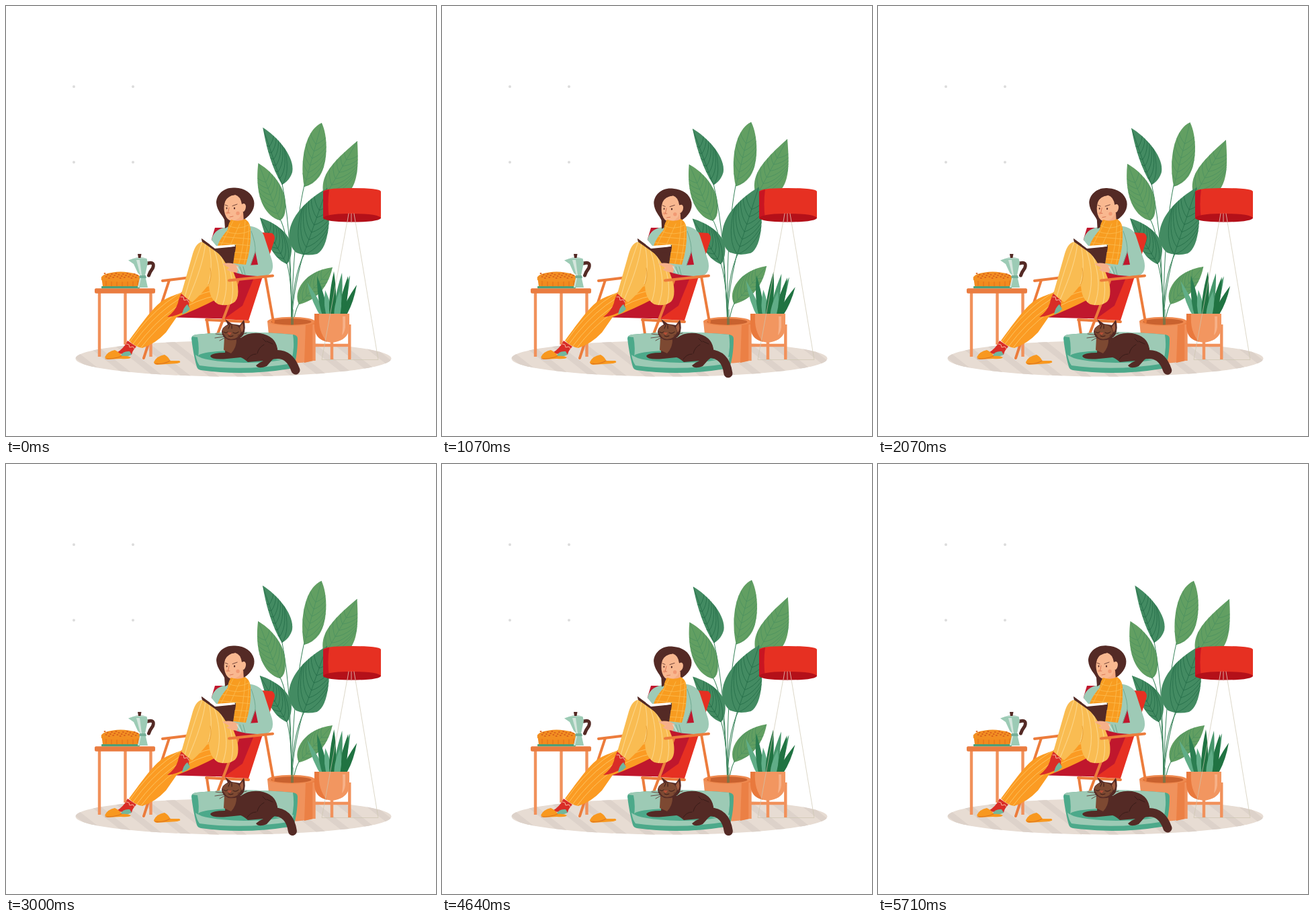
An HTML page for the animation above (5780 ms loop, 640 by 640 pixels).

```html
<!DOCTYPE html>
<html lang="en">
<head>
<meta charset="utf-8">
<title>Reading at home</title>
<style>
  html, body { margin: 0; width: 100%; height: 100%; overflow: hidden; background: #fff; }
  svg { display: block; width: 100vw; height: 100vh; }
  .line { fill: none; stroke-linecap: round; stroke-linejoin: round; }
  .wood { stroke: #ec7c3c; stroke-width: 4; }
  .pale { stroke: #f1915b; stroke-width: 4.4; stroke-linecap: butt; }
  .stem { stroke: #38835a; stroke-width: 1; }
  .dark { fill: #542a25; }
</style>
</head>
<body>
<svg viewBox="0 0 640 640">
  <defs>
    <clipPath id="rugClip"><ellipse cx="338.5" cy="524.8" rx="235" ry="26.6"/></clipPath>
    <clipPath id="farLegClip"><path id="farLeg" d="M306 409C280 421 246 430 231 440C216 452 198 478 183 498Q191 507 203 509Q222 503 238 486L254 463Q284 452 318 434Z"/></clipPath>
    <clipPath id="nearLegClip"><path id="nearLeg" d="M292 351C284 352 280 361 277 372L261 428Q269 436 277 441Q291 429 302 414Q302 436 316 444Q331 448 341 440Q347 434 345 417Q340 391 323 371Q307 353 292 351Z"/></clipPath>
    <clipPath id="scarfClip"><path id="scarf" d="M335 318Q346 322 356 317Q365 323 364 337Q365 360 357 385L338 383Q340 367 342 355L314 362Q315 350 330 333Q331 323 335 318Z"/></clipPath>
  </defs>

  <g fill="#dcdcdc">
    <circle cx="101" cy="120" r="2"/><circle cx="189" cy="120" r="2"/>
    <circle cx="101" cy="232.500" r="2"/><circle cx="189" cy="232.500" r="2"/>
  </g>

  <g clip-path="url(#rugClip)">
    <path fill="#e7dcd3" d="M100 495H580V555H100Z"/>
    <g id="rugStripes" stroke="#ddd2ca" stroke-width="9"></g>
  </g>

  <!-- tall plant -->
  <g id="plant">
    <g class="line stem">
      <path d="M425 477C424 400 424 330 411 264"/>
      <path d="M425 477C426 400 432 320 444 267"/>
      <path d="M425 477C426 410 452 330 474 283"/>
      <path d="M426 477C424 400 422 345 408 317"/>
      <path d="M425 477C425 430 431 393 445 367"/>
      <path d="M425 477C426 440 424 405 418 382"/>
      <path d="M427 477Q429 456 436 443"/>
    </g>
  </g>
  <path fill="#f0925c" d="M389 469H460L457 528Q425 535 395 528Z"/>
  <path fill="#eb8045" d="M446 473L460 470L457 528L444 531Z"/>
  <ellipse cx="424.500" cy="469.500" rx="35.500" ry="6.800" fill="#ef8a50"/>
  <ellipse cx="424.500" cy="470" rx="30" ry="4.700" fill="#c9622f"/>
  <path class="line stem" d="M425 474V450M427 474V452"/>

  <!-- small plant -->
  <g id="blades"></g>
  <path class="line pale" d="M458.500 474V528M511.300 474V526M485 498V526M458 505H513"/>
  <path fill="#f29660" d="M459 458H511V478Q510 498 485 501Q460 498 459 478Z"/>
  <path fill="#e9793d" d="M459 458H466Q464 485 478 500Q460 496 459 478Z"/>
  <path fill="#f7b188" d="M501 462H505V478Q504 486 500 490Q502 478 501 462Z"/>

  <!-- lamp -->
  <path class="line" stroke="#cdc6b0" stroke-width=".7" d="M510 309L470 526.500H554L518 309M514 309V322"/>
  <path fill="#e63022" d="M472 276Q474 271 515 271Q556 271 558 276V316Q515 323 472 316Z"/>
  <path fill="#c91522" d="M472 276L481 273Q478 295 481 317L472 316Z"/>
  <path fill="#b41019" d="M472 316Q474 309 515 309Q556 309 558 316Q553 321.500 515 321.500Q478 321.500 472 316Z"/>
  <path class="line" stroke="#e6cfc0" stroke-width=".8" d="M510 309L508 321M518 309L520 321M514 309V321"/>

  <!-- table, pie and coffee pot -->
  <path class="line pale" d="M139 427V522M177.500 427V504M215.500 427V522"/>
  <rect x="132" y="420.300" width="90" height="7.400" rx="2" fill="#ea7c40"/>
  <rect x="142" y="417" width="57" height="3.300" rx="1" fill="#4c9f78"/>
  <path fill="#f28b1e" d="M142 403H200L198 417H144Z"/>
  <path class="line" stroke="#dd6f1b" stroke-width="1" d="M149 409V416M157 410V417M165 410V417M173 410V417M181 410V417M189 410V417M196 408V415"/>
  <path fill="#f28f22" d="M142 408Q140 402 148 399Q170 392 194 399Q202 402 200 408Q171 413 142 408Z"/>
  <g id="crumbs" fill="#d9601c"></g>
  <path class="line" stroke="#542a25" stroke-width="5" d="M211 383Q222 380 218.500 390Q214 396 212.500 401"/>
  <path fill="#9ccbb5" d="M182 378.500L189 376H209.500L211 382L207 401L211 419H196L200 401L196 397L190 384Z"/>
  <path fill="#d3e5dc" d="M194 378H199L202 401L198 419H196L200 401Z"/>
  <path fill="#75af98" d="M199 401H208L209 405H198Z"/>
  <path fill="#bcd9cc" d="M189 376Q199 371 209.500 376Z"/>
  <path class="dark" d="M196 369H201.500L200.500 375H197Z"/>

  <!-- chair -->
  <path class="line wood" d="M243 408L205 524M299 468L302 488M386 403L398 470M298 467L361 470"/>
  <path fill="#c0172d" d="M311 330H327L384 338L368 430L345 466L240 463L278 440Z"/>
  <path fill="#e63022" d="M380 337L396 338Q402 342 399 350L361 468L324 466L352 446L384 368Z"/>
  <path class="line wood" d="M233 409L270 404.500M345 409L315 488"/>

  <!-- reader -->
  <path fill="#9ecab6" d="M328 329Q310 332 306 347L308 361L336 391L363 388L371 365L375 385L343 387L342 397Q365 404 389 401Q400 396 396 379L384 342Q380 330 361 327Z"/>
  <path class="line" stroke="#70aa92" stroke-width="1" d="M365 335Q372 354 371 366L364 386M348 388L352 399M353 388L356 400"/>
  <use href="#farLeg" fill="#fb9b23"/>
  <g clip-path="url(#farLegClip)" class="line" stroke="#fbc35f" stroke-width="1">
    <path d="M306 415Q240 432 189 503M310 423Q246 437 194 507M314 431Q251 442 199 511M302 410Q235 427 185 499"/>
  </g>
  <path fill="#d92d27" d="M262 425L274 432Q271 443 273 451Q254 462 240 463Q255 452 257 437Z"/>
  <path fill="#72b69d" d="M262 459Q264 448 270 444L274 451Q269 457 262 459Z"/>
  <path class="line" stroke="#f6b8a0" stroke-width="1" d="M260 433L264 433L265 438L270 437L272 441"/>
  <use href="#nearLeg" fill="#f9bc52"/>
  <g clip-path="url(#nearLegClip)" class="line" stroke="#fcd588" stroke-width="1.100">
    <path d="M292 351Q278 390 266 433M297 352Q294 385 271 437M302 356Q309 390 301 414M309 360Q325 405 311 443M317 365Q336 410 322 446M326 374Q344 412 334 446"/>
  </g>
  <path class="line" stroke="#eaa238" stroke-width="1" d="M302 414Q307 402 304 390"/>

  <g id="head">
    <path class="dark" d="M341 270.500C324 269 313 281 313 293C314 305 322 311 325 318L326 331Q337 326 343 316L354 318C366 310 371 300 369 290C366 278 355 271 341 270.500Z"/>
    <path fill="#f5ab83" d="M334 307H353L354 321Q344 328 334 321Z"/>
    <path fill="#f9b890" d="M326 291Q329 283 341 281Q349 283 351 295Q356 292 357 298Q357 305 352 307Q348 319 336 320Q329 319 326 310Q323 301 326 291Z"/>
    <path class="dark" d="M325 293Q328 282 341 281L333 278L324 284Z"/>
    <circle cx="345" cy="308.500" r="2.700" fill="#f19a74"/><circle cx="329" cy="308" r="1.800" fill="#f19a74"/>
    <path class="line" stroke="#542a25" stroke-width=".8" d="M326 296L330 297.500M337 297.500L344 295"/>
    <path class="line" stroke="#d67151" stroke-width=".9" d="M332 300L330.500 308H333M333 314L338 313"/>
    <ellipse cx="328.500" cy="301" rx=".9" ry="1.400" class="dark"/><ellipse cx="340" cy="301" rx="1.100" ry="1.500" class="dark"/>
  </g>
  <use href="#scarf" fill="#f89c20"/>
  <g clip-path="url(#scarfClip)" class="line" stroke="#fbb94c" stroke-width=".9">
    <path d="M329 325Q343 336 363 325M324 334Q345 344 365 334M318 343L366 347M315 352L366 357M335 366L365 368M335 376L365 378M338 320L318 360M348 324L331 362M356 320Q354 360 345 390M362 324Q361 360 353 390"/>
  </g>
  <path class="dark" d="M291 346L310 360L342 356L338 384L327 383Q317 364 292 351Z"/>
  <path fill="#fff" d="M304 346L313 357L340 355L341 358L312 363L303 356Z"/>
  <path class="dark" d="M291 346L311 361L342 358L341 366L316 368L292 351Z"/>
  <path fill="#f6b089" d="M322 384Q334 380 346 387L344 397Q333 396 328 392L333 390Z"/>
  <path class="line" stroke="#cfe6db" stroke-width="1.500" d="M344 388L349 397"/>
  <path class="line wood" d="M332 408.500L397 401.500"/>

  <!-- feet -->
  <path fill="#d92d27" d="M181 498L194 507Q188 513 187 519L163 517Q176 510 181 498Z"/>
  <path fill="#72b69d" d="M170 521Q174 513 184 514L187 519Q180 523 170 521Z"/>
  <path class="line" stroke="#f6b8a0" stroke-width="1" d="M179 503L183 504L184 508L189 507L191 510"/>
  <path fill="#f8981f" d="M147 523Q151 514 162 512Q170 516 172 521Q181 520 186 523Q184 526 171 525L151 526Z"/>
  <path class="line" stroke="#dd7520" stroke-width="1" d="M148 525Q160 526 172 521"/>
  <path fill="#f8981f" d="M220 530Q224 521 236 519Q243 523 244 528L258 528Q262 531 254 532L225 534Q220 533 220 530Z"/>
  <path class="line" stroke="#dd7520" stroke-width="1.200" d="M222 532Q234 534 244 528"/>

  <!-- cat and bed -->
  <path fill="#4ca98a" d="M276 495Q276 490 283 489Q354 482 427 489Q434 490 434 495Q434 518 429 535Q428 539 422 540Q354 551 290 542Q285 541 284 537Q279 520 276 495Z"/>
  <path fill="#9dcab5" d="M277 492Q278 490 283 489Q354 482 427 489Q430 508 425 527L286 523Q288 507 285 493Z"/>
  <ellipse cx="350" cy="521" rx="64" ry="8.500" fill="#4ca98a"/>
  <path fill="#9dcab5" d="M282 519Q292 529 354 531Q404 531 428 522L426 532Q354 544 288 535Q284 530 282 519Z"/>
  <g id="tail"><path class="line" stroke="#542a25" stroke-width="13" d="M397 519C415 516 425 525 431 542"/></g>
  <path class="dark" d="M327 500Q337 490 350 494Q360 485 378 487Q401 491 404 510Q405 522 396 527L388 536Q376 541 372 535Q376 531 383 528L360 530Q353 524 349 523L329 525Q306 527 304 521Q307 516 326 516Z"/>
  <path fill="#7d4932" d="M325 493Q332 500 343 493Q344 508 335 517L324 512Z"/>
  <path class="line" stroke="#361b18" stroke-width=".9" d="M374 517Q376 508 384 504M359 526Q364 518 372 518M388 499L397 503M382 495L387 500"/>
  <path class="dark" d="M326 466L336 473L348 475L354 467Q358 480 353 490Q345 499 331 497Q321 493 321 484Q322 478 330 474Z"/>
  <path fill="#7d4932" d="M322 482Q326 474 337 474Q348 475 350 485Q347 495 335 496Q324 495 322 482Z"/>
  <path fill="#a35e42" d="M352 472Q355 481 351 486L348 478Z"/>
  <path class="line" stroke="#361b18" stroke-width="1" d="M324 485Q327 488 330 485M338 486Q342 489 346 485M331 491Q334 493 338 491M331 480L333 475M336 480V475"/>
  <path class="line" stroke="#542a25" stroke-width=".8" d="M326 490L312 488M326 492L311 494M327 493L318 498M345 490L358 487M345 492L357 494"/>
  <path fill="#b54e36" d="M329 486H336L333 490Z"/>
</svg>

<script>
const NS = "http://www.w3.org/2000/svg";
const LOOP = 5780;
const byId = id => document.getElementById(id);

function add(parent, tag, attrs) {
  const node = document.createElementNS(NS, tag);
  for (const key in attrs) node.setAttribute(key, attrs[key]);
  return parent.appendChild(node);
}

const plant = byId("plant"), blades = byId("blades"), head = byId("head"), tail = byId("tail");
const SHADES = {
  light: ["#629f62", "#4c9160"],
  dark: ["#438b62", "#246d48"]
};

// Each leaf: shade, outline, tip x and y, base x and y.
const leaves = [
  ["light", "M523 201C525 240 524 265 507 281L474 285C466 258 477 239 523 201Z", 523, 201, 474, 285],
  ["dark", "M382.500 181C405 195 431 226 426 248Q422 260 411 266C398 245 388 215 382.500 181Z", 382.5, 181, 411, 266],
  ["light", "M470 174C480 195 479 235 467 253Q458 266 444 269C437 235 444 185 470 174Z", 470, 174, 444, 269],
  ["light", "M375.500 234C395 245 418 270 416 300Q416 315 408 319C383 312 370 280 375.500 234Z", 376, 234, 408, 319],
  ["dark", "M478 271C485 310 481 360 463 369Q446 373 432 367C411 349 418 305 478 271Z", 478, 271, 443, 370],
  ["dark", "M378 315C400 322 428 340 425 365Q424 378 418 384C396 375 388 350 378 315Z", 378, 315, 418, 384],
  ["light", "M486 389C478 425 455 440 436 444C426 425 445 394 486 389Z", 486, 389, 436, 444]
];

leaves.forEach(([shade, d, tx, ty, bx, by], i) => {
  const [fill, stroke] = SHADES[shade];
  const clip = add(plant, "clipPath", { id: "leaf" + i });
  add(clip, "path", { d });
  add(plant, "path", { d, fill });
  const dx = tx - bx, dy = ty - by;
  let veins = `M${bx} ${by}L${tx} ${ty}`;
  for (let k = 0; k < 7; k++) {
    const x = bx + dx * k / 9, y = by + dy * k / 9;
    for (const side of [-1, 1]) {
      const nx = -dy * side, ny = dx * side;
      veins += `M${x} ${y}q${nx * .2 + dx * .14} ${ny * .2 + dy * .14} ${nx * .24 + dx * .6} ${ny * .24 + dy * .6}`;
    }
  }
  add(plant, "path", { d: veins, stroke, fill: "none", "stroke-width": .8, "clip-path": `url(#leaf${i})` });
});

// Each blade: base x, tip x, tip y, colour.
[
  [474, 448, 411, "#60ad87"], [500, 522, 415, "#207342"], [494, 512, 401, "#46966b"],
  [476, 463, 402, "#2b7e51"], [482, 475, 423, "#60ad87"], [498, 509, 402, "#207342"],
  [491, 500, 397, "#46966b"], [485, 488, 395, "#207342"], [492, 497, 424, "#60ad87"]
].forEach(([bx, tx, ty, fill]) => {
  const my = ty * .35 + 462 * .65, mx = bx * .6 + tx * .4;
  add(blades, "path", { fill, d: `M${bx - 3} 466Q${mx - 8} ${my} ${tx} ${ty}Q${mx + 8} ${my} ${bx + 3} 466Z` });
});

for (let x = 70; x < 600; x += 41)
  add(byId("rugStripes"), "path", { d: `M${x} 492l84 66` });

for (let i = 0; i < 24; i++)
  add(byId("crumbs"), "ellipse", {
    cx: 147 + i * 2.1, cy: 398 + (i * 5) % 8, rx: 1.5, ry: .9
  });

// Tail position over time: 0 raised, 1 lowered.
const tailKeys = [[0, 0], [1150, 1], [2215, 0], [3200, 1], [4400, 1], [5700, 0], [LOOP, 0]];

function tailAt(t) {
  const i = tailKeys.findIndex(key => key[0] > t);
  const [t0, a] = tailKeys[i - 1], [t1, b] = tailKeys[i];
  const u = (t - t0) / (t1 - t0);
  return a + (b - a) * u * u * (3 - 2 * u);
}

function draw(now) {
  const t = now % LOOP;
  const sway = (1 - Math.cos(2 * Math.PI * (t / (LOOP / 2) + .03))) / 2;
  plant.setAttribute("transform", `rotate(${-2.05 * sway} 425 477)`);
  blades.setAttribute("transform", `rotate(${5.2 * sway} 485 462)`);
  head.setAttribute("transform", `translate(${1.6 * sway} ${1.5 * sway}) rotate(${2 * sway} 343 320)`);
  tail.setAttribute("transform", `rotate(${12 * tailAt(t)} 405 520)`);
}

const start = performance.now();
function tick() {
  draw(performance.now() - start);
  requestAnimationFrame(tick);
}
tick();
</script>
</body>
</html>
```
